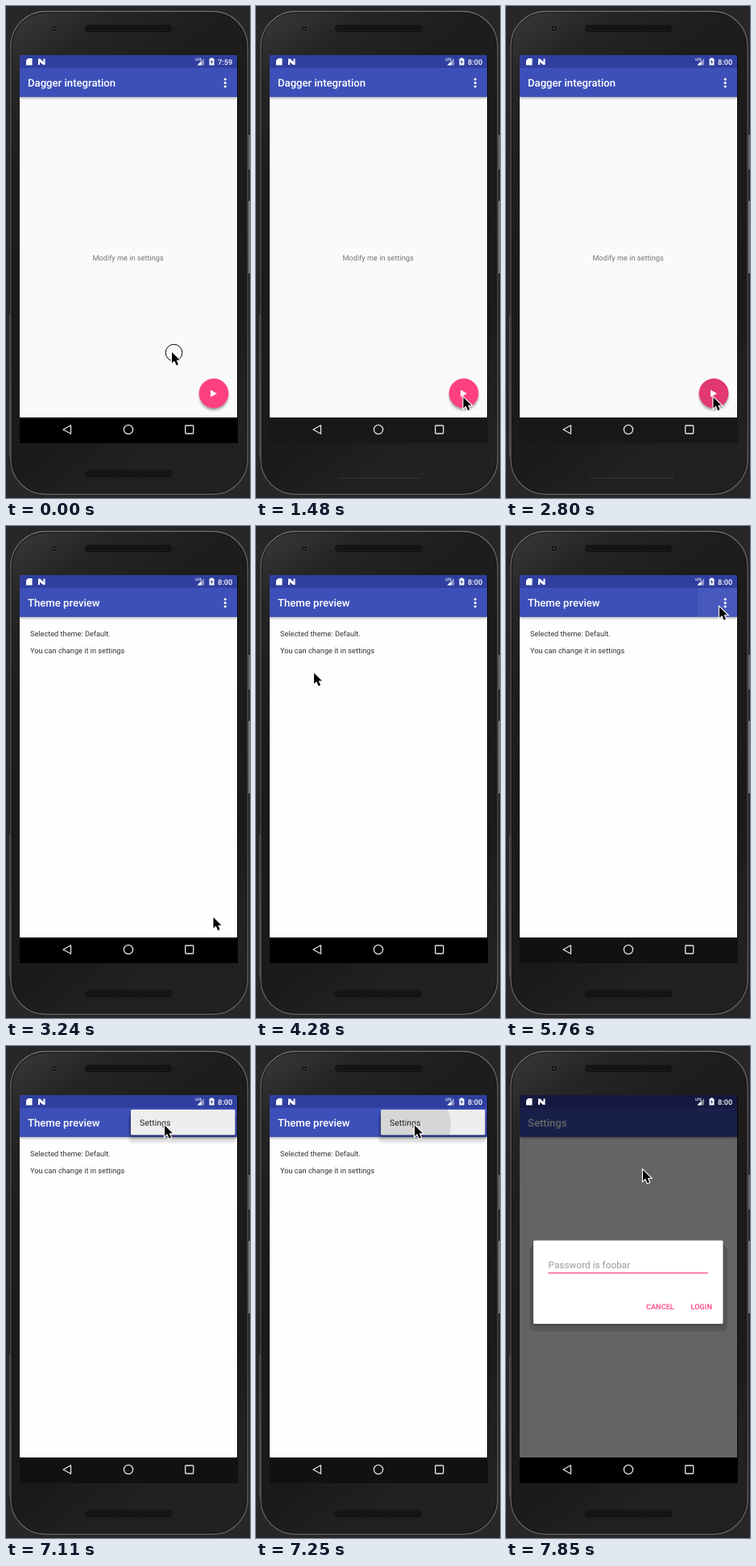
Recreate the animation shown at these times as an HTML page. Size 303 by 611 pixels, loop 7.99 s.

```html
<!DOCTYPE html>
<html lang="en">
<head>
<meta charset="utf-8">
<style>
html, body { margin: 0; width: 100%; height: 100%; overflow: hidden; background: #272727; }
svg { display: block; width: 100vw; height: 100vh; }
text { font-family: Roboto, sans-serif; font-size: 9.2px; text-rendering: geometricPrecision; }
.title { font-size: 13.14px; font-weight: 500; fill: #fff; }
.btn { font-weight: 500; fill: #ff4081; }
</style>
</head>
<body>
<svg viewBox="0 0 303 611" xmlns="http://www.w3.org/2000/svg">
  <defs>
    <linearGradient id="body" x2=".35" y2="1">
      <stop offset="0" stop-color="#3a3a3a"/>
      <stop offset=".14" stop-color="#252525"/>
      <stop offset=".3" stop-color="#1d1d1d"/>
      <stop offset=".85" stop-color="#1a1a1a"/>
      <stop offset="1" stop-color="#212121"/>
    </linearGradient>
    <linearGradient id="rim" x2="0" y2="1">
      <stop offset="0" stop-color="#6a6a6a"/>
      <stop offset=".1" stop-color="#555"/>
      <stop offset=".6" stop-color="#444"/>
      <stop offset="1" stop-color="#606060"/>
    </linearGradient>
    <pattern id="mesh" width="2" height="2" patternUnits="userSpaceOnUse">
      <rect width="2" height="2" fill="#0c0c0c"/>
      <rect width="1" height="1" fill="#303030"/>
    </pattern>
    <filter id="soft" x="-30%" y="-30%" width="160%" height="170%"><feGaussianBlur stdDeviation="1.8"/></filter>
    <clipPath id="screen"><rect x="17" y="61" width="270" height="450"/></clipPath>
    <clipPath id="disc"><circle cx="258" cy="481" r="18.4"/></clipPath>
    <clipPath id="item"><rect x="155" y="79" width="129.500" height="31.500" rx="1.500"/></clipPath>
    <g id="bar">
      <rect x="17" y="112" width="270" height="2.500" fill="#000" opacity=".35" filter="url(#soft)"/>
      <rect x="17" y="77" width="270" height="36" fill="#3d50b9"/>
    </g>
  </defs>

  <rect width="303" height="611" fill="#272727"/>
  <rect x="301" y="160" width="2" height="43" fill="#666"/>
  <rect x="301" y="242" width="2" height="90" fill="#777"/>
  <rect x="6" y="6.800" width="294" height="599.500" rx="43" fill="url(#body)" stroke="url(#rim)" stroke-width="1.400"/>
  <rect x="7.500" y="8.300" width="291" height="596.500" rx="41.500" fill="none" stroke="#151515"/>
  <path d="M4.500 383V560" stroke="#505050"/>
  <circle cx="60" cy="28" r="4" fill="#151515" stroke="#3a3a3a"/>
  <circle cx="60" cy="28" r="1.500" fill="#3c3c3c"/>
  <rect x="98.500" y="24" width="107.500" height="8" rx="4" fill="url(#mesh)" stroke="#111"/>
  <rect id="grill" x="98.500" y="577" width="107.500" height="8" rx="4" fill="url(#mesh)" stroke="#111"/>
  <path id="edge" d="M104 586.500H204Q207 586 207.500 580" fill="none" stroke="#333"/>
  <rect x="17" y="61" width="271" height="482" fill="#080808"/>

  <g clip-path="url(#screen)">
    <g id="home">
      <rect x="17" y="61" width="270" height="450" fill="#fafafa"/>
      <text x="107.500" y="315.500" fill="#757575">Modify me in settings</text>
      <circle cx="258" cy="484" r="18" fill="#000" opacity=".35" filter="url(#soft)"/>
      <circle cx="258" cy="481" r="18.400" fill="#ff4081"/>
      <g clip-path="url(#disc)"><circle id="press" cx="258" cy="484" r="0" fill="#000" opacity=".11"/></g>
      <path d="M254 476.800L262 481.300L254 485.800Z" fill="#fff"/>
      <use href="#bar"/>
      <text class="title" x="27" y="100.300">Dagger integration</text>
    </g>
    <g id="preview">
      <rect x="17" y="61" width="270" height="450" fill="#fefefe"/>
      <text x="30" y="136.500" fill="#333">Selected theme: Default.</text>
      <text x="30" y="158" fill="#333">You can change it in settings</text>
      <use href="#bar"/>
      <rect id="tap" x="238" y="77" width="49" height="36" fill="#fff" opacity=".05"/>
      <text class="title" x="27" y="100.300">Theme preview</text>
    </g>
    <g id="settings">
      <rect x="17" y="61" width="270" height="450" fill="#fafafa"/>
      <use href="#bar"/>
      <text class="title" x="27" y="100.300">Settings</text>
    </g>
    <g id="dots" fill="#fff">
      <circle cx="272.200" cy="91" r="1.600"/><circle cx="272.200" cy="95.500" r="1.600"/><circle cx="272.200" cy="100" r="1.600"/>
    </g>
    <rect x="17" y="61" width="270" height="16" fill="#303f9f"/>
    <g id="menu">
      <rect x="152" y="86" width="134" height="34" rx="5" fill="#000" opacity=".12" filter="url(#soft)"/>
      <rect x="154" y="82" width="131.500" height="31" rx="3" fill="#000" opacity=".3" filter="url(#soft)"/>
      <rect x="155" y="79" width="129.500" height="31.500" rx="1.500" fill="#eee"/>
      <g clip-path="url(#item)"><circle id="ripple" cx="197" cy="98" r="0" fill="#000" opacity=".1"/></g>
      <text x="166" y="98.800" fill="#222" style="font-size:10.500px">Settings</text>
    </g>
    <rect id="dim" x="17" y="61" width="270" height="450"/>
    <g id="dialog">
      <rect x="29" y="247" width="246" height="107.500" rx="7" fill="#000" opacity=".14"/>
      <rect x="33" y="243" width="237" height="104" rx="3" fill="#000" opacity=".16" filter="url(#soft)"/>
      <rect x="34" y="241.500" width="235.500" height="103.500" rx="1.500" fill="#fff"/>
      <text x="52.500" y="276" fill="#9a9a9a" style="font-size:11.830px">Password is foobar</text>
      <path d="M52.500 281.800H251" stroke="#ff4081" stroke-width="1.200"/>
      <text class="btn" x="174" y="327.300">CANCEL</text>
      <text class="btn" x="229.500" y="327.300">LOGIN</text>
    </g>
  </g>

  <g fill="#fff">
    <path d="M27.500 65H32.500V73.500H25V67.500Z"/>
    <path d="M40 65.500H42.500L46.500 69.500V65.500H48.500V73H46L42 69.500V73H40Z"/>
    <text x="235.300" y="68.300" style="font-size:4.600px;font-weight:700">LTE</text>
    <path d="M246 65V73.500H237.500Z" opacity=".45"/>
    <path d="M242.500 68.500V73.500H237.500Z"/>
    <path d="M254 64.500H257V65.500H258.500V73.500H252.500V65.500H254Z"/>
    <path d="M256 66.500L254 70H255.300V72.500L257.200 69H256Z" fill="#303f9f"/>
    <text id="clock" x="263" y="72.500" style="font-weight:500"></text>
  </g>

  <rect id="nav" x="17" y="511" width="271" height="32"/>
  <g fill="none" stroke="#e4e4e4" stroke-width="1.300">
    <path d="M71 526L80.500 520.700V531.300Z" stroke-linejoin="round"/>
    <circle cx="152" cy="526" r="5.600"/>
    <rect x="222.700" y="521" width="10" height="10" rx=".8"/>
  </g>

  <circle id="ring" cx="208.500" cy="430.500" r="10.300" fill="none" stroke="#000"/>
  <path id="cursor" d="M0 0V13.500L3.200 10.600L5.600 16.200L8 15.200L5.700 9.700H9.900Z" fill="#000" stroke="#fff" stroke-width="2.200" paint-order="stroke"/>
</svg>
<script>
const LOOP = 7990, TICK = LOOP / 54;
const $ = id => document.getElementById(id);
const clamp = x => Math.max(0, Math.min(1, x));
const ramp = (n, a, b) => clamp((n - a) / (b - a));
const ease = x => x * x * (3 - 2 * x);
const fade = (id, o) => $(id).setAttribute('opacity', o);
const show = (id, on) => $(id).style.display = on ? '' : 'none';
const radius = (id, r) => $(id).setAttribute('r', r);

// pointer stops: tick, x, y
const stops = [
  [2, 206, 430], [10, 257.5, 486], [23, 257.5, 486], [29, 72, 182.5],
  [30, 69, 150], [31, 75, 122], [38, 265, 100.5], [42, 265, 100.5],
  [46, 197, 98.5], [52, 197, 98.5], [53, 170, 154]
];

function pointer(n) {
  let i = 0;
  while (i < stops.length - 2 && n > stops[i + 1][0]) i++;
  const [a, x, y] = stops[i], [b, u, v] = stops[i + 1];
  const k = ease(ramp(n, a, b));
  return [x + (u - x) * k, y + (v - y) * k];
}

// a new screen rises a little while it fades in
function enter(id, k) {
  show(id, k > 0);
  fade(id, k);
  $(id).setAttribute('transform', `translate(0 ${(1 - k) * 24})`);
}

function draw(t) {
  const n = Math.floor((t + 18) / TICK);
  const dull = n >= 3 && n < 20;

  $('clock').textContent = n < 5 ? '7:59' : '8:00';
  show('ring', n < 1);
  show('grill', !dull);
  show('edge', dull);
  $('nav').setAttribute('fill', dull ? '#181818' : n >= 32 && n < 50 ? '#111' : '#000');

  radius('press', n < 20 ? 24 * ramp(n, 15, 18) : 0);
  enter('preview', ease(ramp(n, 19, 22)));
  show('tap', n >= 39 && n < 42);

  const open = ease(ramp(n, 40, 43));
  show('menu', open > 0 && n < 50);
  fade('menu', open);
  $('menu').setAttribute('transform', `translate(284 79) scale(${0.5 + open / 2}) translate(-284 -79)`);
  radius('ripple', 90 * ramp(n, 48, 50));

  enter('settings', ramp(n, 49, 51));
  show('dots', n < 50);
  const asked = ramp(n, 49, 51);
  fade('dim', 0.6 * asked);
  show('dialog', n >= 50);
  fade('dialog', asked);

  const [x, y] = pointer(n);
  $('cursor').setAttribute('transform', `translate(${x} ${y})`);
}

const start = performance.now();
function frame() {
  draw((performance.now() - start) % LOOP);
  requestAnimationFrame(frame);
}
frame();
</script>
</body>
</html>
```
